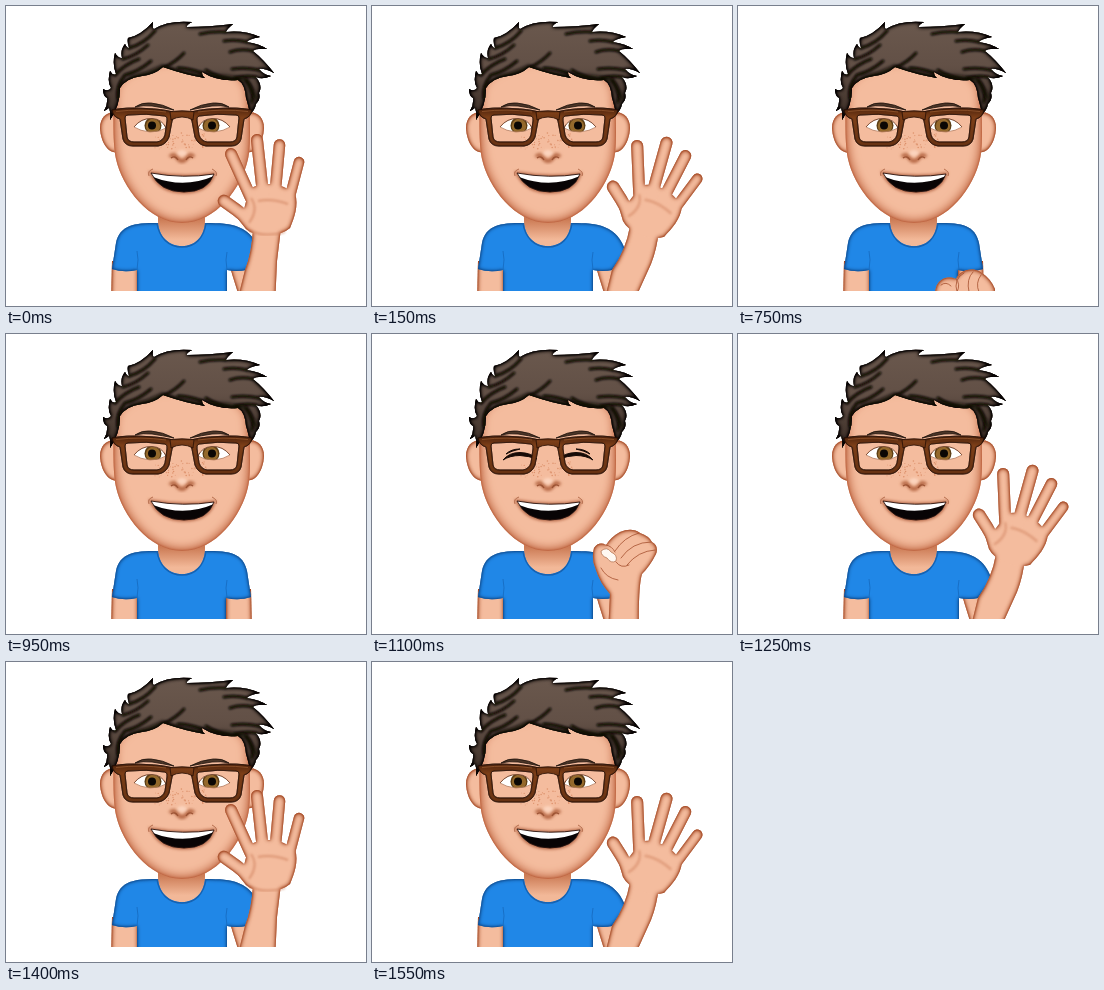
An HTML page for the animation above (1.7 s loop, 360 by 300 pixels).

```html
<!DOCTYPE html>
<html lang="en">
<head>
<meta charset="utf-8">
<title>Waving avatar</title>
<style>
html, body { margin: 0; width: 100%; height: 100%; overflow: hidden; background: #fff; }
svg { display: block; width: 360px; height: 300px; }
.skin { fill: #f4bc9e; stroke: none; }
.finger { fill: none; stroke: #f4bc9e; stroke-linecap: round; }
.crease { fill: none; stroke: #a04a28; stroke-linecap: round; opacity: .75; }
.palm { fill: none; stroke: #c4704b; stroke-width: 2; opacity: .5; }
.pose { visibility: hidden; animation: 1700ms step-end infinite; }
.inward { animation-name: inward; }
.outward { animation-name: outward; }
.low { animation-name: low; }
.lowered { animation-name: lowered; }
.raised { animation-name: raised; }
.fist { animation-name: fist; }
.open { animation-name: open; }
@keyframes inward { 0%, 82.35% { visibility: visible } 8.82%, 91.17%, 100% { visibility: hidden } }
@keyframes outward { 0%, 44.11%, 82.35% { visibility: hidden } 8.82%, 73.52%, 91.17%, 100% { visibility: visible } }
@keyframes low { 0%, 55.88%, 100% { visibility: hidden } 44.11% { visibility: visible } }
@keyframes lowered { 0%, 64.7%, 100% { visibility: hidden } 44.11% { visibility: visible } }
@keyframes raised { 0%, 64.7%, 100% { visibility: visible } 44.11% { visibility: hidden } }
@keyframes fist { 0%, 73.52%, 100% { visibility: hidden } 64.7% { visibility: visible } }
@keyframes open { 0%, 73.52%, 100% { visibility: visible } 64.7% { visibility: hidden } }
</style>
</head>
<body>
<svg viewBox="0 0 360 300">
<defs>
  <clipPath id="crop"><rect width="360" height="285"/></clipPath>
  <clipPath id="eyeShape"><path d="M128,121Q135,112 146,112.5Q156,113 160,122Q154,126 144,126Q134,125 128,121Z"/></clipPath>
  <clipPath id="mouthShape"><path id="mouth" d="M145,167Q177,173 208,168Q202,186 178,186Q154,186 145,167Z"/></clipPath>
  <clipPath id="hairShape"><path id="hair" d="M104,114Q105,107 103,102Q100,104 98,105Q102,98 101,92Q97,90 97,83Q102,86 105,82Q101,76 104,65Q107,70 110,68Q106,58 109,47Q112,52 116,52Q114,44 119,38Q121,42 123,42Q121,36 122,32Q134,30 147,16Q146,22 148,23Q162,14 186,16Q180,19 181,21Q203,21 227,18Q221,23 220,26Q238,24 254,31Q243,33 241,36Q254,38 261,43Q250,42 247,45Q258,54 268,67Q258,62 253,63Q258,69 265,70Q256,74 250,71Q257,80 253,87Q255,93 250,98Q249,104 244,108Q242,98 240,92Q239,78 232,74Q212,76 196,66Q196,70 199,72Q180,69 157,61Q148,69 136,70Q120,72 114,82Q114,100 104,114Z"/></clipPath>
  <linearGradient id="hairTone" x2="0" y2="1">
    <stop stop-color="#6a584d"/><stop offset=".45" stop-color="#625046"/><stop offset="1" stop-color="#3a2c24"/>
  </linearGradient>
  <linearGradient id="frameTone" x2="0" y2="1">
    <stop stop-color="#4e230c"/><stop offset=".25" stop-color="#7d3f18"/><stop offset="1" stop-color="#6a3414"/>
  </linearGradient>
  <linearGradient id="neckTone" x2="0" y2="1">
    <stop offset=".4" stop-color="#cb7a54"/><stop offset=".85" stop-color="#f2b898"/>
  </linearGradient>
  <filter id="soft" x="-50%" y="-50%" width="200%" height="200%"><feGaussianBlur stdDeviation="1.6"/></filter>
  <filter id="hazy" x="-20%" y="-20%" width="140%" height="140%"><feGaussianBlur stdDeviation=".9"/></filter>
</defs>

<g clip-path="url(#crop)">
  <path class="skin" filter="url(#limbRim)" d="M106,255H132V300H105Z"/>

  <g class="pose lowered">
    <path class="skin" filter="url(#limbRim)" d="M220,255H245L246,300H220Z"/>
    <path fill="#2087e7" filter="url(#shirtRim)" d="M151,217C128,217 114,219 110,237L106,263Q118,267 131,264V300H220V264Q233,267 245,263L241,237C237,219 224,217 200,217Z"/>
  </g>
  <g class="pose raised">
    <path class="skin" filter="url(#limbRim)" d="M223,258H244L240,300H236Z"/>
    <path fill="#2087e7" filter="url(#shirtRim)" d="M151,217C128,217 114,219 110,237L106,263Q118,267 131,264V300H221V264Q231,266 240,264L254,246C245,219 226,217 200,217Z"/>
  </g>
  <path d="M131,264Q133,253 131,245M221,264Q219,253 221,246" fill="none" stroke="#1565b8" opacity=".7"/>

  <path fill="url(#neckTone)" d="M152,195H199V216C198,232 188,240 176,240S153,232 152,216Z"/>
  <path d="M151,217C153,232 163,241 176,241S198,232 200,217" fill="none" stroke="#1562b2" stroke-width="1.5"/>

  <path id="ear" class="skin" filter="url(#limbRim)" d="M114,108C104,103 94,110 94,122C95,138 103,149 114,146Z"/>
  <use href="#ear" transform="translate(352) scale(-1 1)"/>
  <path class="skin" filter="url(#faceRim)" d="M108,85C107,115 107,140 110,153C116,181 143,217 176,217C210,217 236,181 242,153C245,140 244,115 243,85C238,42 113,42 108,85Z"/>

  <g id="freckles" fill="#d07a50" opacity=".65"></g>

  <path d="M164,151Q168,146 172,153Q176,157 180,153Q184,146 188,151" fill="none" stroke="#b86a47" stroke-width="4" filter="url(#soft)"/>
  <path d="M165,152Q169,149 172,154M180,154Q183,149 187,152" fill="none" stroke="#9d5435" stroke-width="1.4"/>
  <ellipse cx="176" cy="147" rx="5" ry="3" fill="#ffe0cd" opacity=".7" filter="url(#soft)"/>

  <use href="#mouth" stroke="#b96a48" stroke-width="3" filter="url(#soft)"/>
  <g clip-path="url(#mouthShape)">
    <rect x="140" y="160" width="75" height="30" fill="#fff"/>
    <path d="M147,171Q178,183 208,170V192H147Z" fill="#080405"/>
  </g>
  <use href="#mouth" fill="none" stroke="#2a1009" stroke-width=".9"/>
  <path d="M143,170Q141,165 147,163M210,170Q212,166 206,163" fill="none" stroke="#a85d3c" opacity=".8"/>

  <g class="pose open">
    <g id="eye">
      <g clip-path="url(#eyeShape)">
        <rect x="125" y="110" width="40" height="20" fill="#fff"/>
        <circle cx="147" cy="119.5" r="8.5" fill="#5b3d14"/>
        <circle cx="147" cy="120" r="7.2" fill="#94692c"/>
        <circle cx="146" cy="119.5" r="4" fill="#0b0704"/>
      </g>
      <path d="M128,121Q135,112 146,112.5Q156,113 160,122" fill="none" stroke="#7a4a32" stroke-width="1"/>
      <path d="M128,121Q134,125 144,126Q154,126 160,122" fill="none" stroke="#b47c5d" stroke-width=".8"/>
    </g>
    <use href="#eye" transform="translate(352) scale(-1 1)"/>
  </g>
  <g class="pose fist">
    <path id="shutEye" d="M131,126Q137,118.5 148,118.5Q160,119 165,125Q157,122 148,121.5Q138,121.5 131,126ZM134,120Q139,115 148,115Q139,117 134,120Z" fill="#170b07" stroke="#170b07" stroke-width="1"/>
    <use href="#shutEye" transform="translate(352) scale(-1 1)"/>
  </g>

  <path id="brow" d="M129,101Q136,96 145,97Q157,98 168,104Q156,101.5 146,100Q137,99 129,101Z" fill="#4b3527" stroke="#20140d" stroke-width=".8"/>
  <use href="#brow" transform="translate(352) scale(-1 1)"/>

  <use href="#hair" fill="url(#hairTone)" filter="url(#hairRim)"/>
  <g clip-path="url(#hairShape)" fill="none" stroke="#0d0705" stroke-linecap="round">
    <path stroke-width="3" filter="url(#hazy)" d="M112,92Q110,80 119,69Q132,66 145,55M109,69Q119,58 133,53M117,53Q130,50 142,39M123,42Q138,38 149,25M157,62Q170,56 178,47"/>
    <path stroke-width="3" filter="url(#hazy)" d="M196,67Q182,62 172,62M232,75Q212,72 200,64M247,45Q235,42 224,46M253,64Q240,61 226,63M250,71Q240,69 229,72M246,96Q249,84 240,74M241,36Q230,33 218,35M220,26Q207,25 194,28"/>
    <path stroke-width="5" opacity=".6" filter="url(#soft)" d="M116,80Q126,71 140,68L157,61Q182,70 200,70T240,74L250,92"/>
  </g>

  <g fill="url(#frameTone)" stroke="#260f05" stroke-width=".8">
    <path id="lens" fill-rule="evenodd" filter="url(#frameRim)" d="M106,104Q120,101 140,102.5Q156,103 167,106Q169,110 166,115L163,131Q160,139 152,140H127Q119,140 117,133L114,113Q107,111 106,104ZM119,112Q119,109 122,109Q140,107 159,110Q162,111 161,115L159,129Q157,135 151,136H128Q122,136 121,131Z"/>
    <use href="#lens" transform="translate(352) scale(-1 1)"/>
    <path d="M164,105.5Q176,104 188,105.5L187,114Q176,108 165,114Z"/>
  </g>
  <path d="M110,105.5Q135,102.5 160,106M192,106Q217,102.5 242,105.5" fill="none" stroke="#a7673a" opacity=".6"/>

  <g class="pose inward">
    <g filter="url(#limbRim)">
      <path class="skin" d="M247,222Q246,246 239,264L230,300H269L271,255L275,222Z"/>
      <g id="hand">
        <path class="skin" d="M242,184Q252,177 262,178Q274,177 289,187C293,200 288,212 284,222Q276,229 262,229Q248,230 240,223L232,213Q240,204 242,184Z"/>
        <g class="finger">
          <path stroke-width="12" d="M225,148L245,192M251,134L257,188"/>
          <path stroke-width="11.5" d="M273.5,139L269,188"/>
          <path stroke-width="10.5" d="M293,156L283,194"/>
          <path stroke-width="12.5" d="M218,195Q230,203 243,214"/>
        </g>
      </g>
    </g>
    <path id="creases" class="palm" filter="url(#hazy)" d="M245,192Q253,203 243,217M252,195Q266,192 282,198"/>
    <path class="palm" filter="url(#hazy)" d="M242,224Q258,232 279,226"/>
  </g>

  <g class="pose outward">
    <g filter="url(#limbRim)">
      <path class="skin" d="M258,220Q254,244 240,264L231,300H260L279,258Q285,243 287,224Z"/>
      <use href="#hand" transform="translate(18 2) rotate(22 262 200)"/>
    </g>
    <use href="#creases" transform="translate(18 2) rotate(22 262 200)"/>
  </g>

  <g class="pose low">
    <path class="skin" filter="url(#limbRim)" d="M196,300Q196,281 201,276Q208,269 218,273Q221,266 229,264Q238,262 244,267Q253,273 257,283V300Z"/>
    <path class="crease" d="M218,273Q223,278 219,286M226,267Q215,273 219,286M235,266Q228,273 231,286M243,269Q237,277 241,286M203,279Q208,275 213,280"/>
  </g>

  <g class="pose fist">
    <path class="skin" filter="url(#limbRim)" d="M236,300L238,260Q228,249 224,236Q219,225 222,214Q227,207 234,211Q239,203 248,198Q260,193 268,199Q277,202 280,208Q287,212 284,220Q278,232 270,240Q266,253 267,300Z"/>
    <path d="M229,217Q235,212 239,218Q246,221 244,227Q239,230 235,224Q229,222 229,217Z" fill="#fff8f2" stroke="#b77958" stroke-width=".8"/>
    <path class="crease" d="M234,211Q240,212 243,218M267,199Q252,203 243,217M279,208Q260,208 249,224M283,216Q266,217 255,231M244,228Q249,235 257,231M229,234Q234,244 246,246"/>
  </g>
</g>
</svg>
<script>
const svg = document.querySelector('svg');

// Inner rim shading: a wide soft band plus a fine dark edge.
function rim(id, color, wide, edge, strength) {
  const band = (size, gain, name) => `
    <feGaussianBlur in="SourceAlpha" stdDeviation="${size}" result="b"/>
    <feComposite in="SourceAlpha" in2="b" operator="out" result="o"/>
    <feFlood flood-color="${color}"/><feComposite in2="o" operator="in"/>
    <feComponentTransfer result="${name}"><feFuncA type="linear" slope="${gain}"/></feComponentTransfer>`;
  return `<filter id="${id}" x="-10%" y="-10%" width="120%" height="120%" color-interpolation-filters="sRGB">
    ${band(wide, strength, 'wide')}${band(edge, strength * .8, 'edge')}
    <feMerge><feMergeNode in="SourceGraphic"/><feMergeNode in="wide"/><feMergeNode in="edge"/></feMerge></filter>`;
}
svg.querySelector('defs').insertAdjacentHTML('beforeend',
  rim('faceRim', '#b04e28', 6, 1.2, 1.25) +
  rim('limbRim', '#a0431e', 2.6, .8, 1.45) +
  rim('shirtRim', '#0c4688', 2.2, .8, 1.3) +
  rim('hairRim', '#070302', 2.2, 1, 2) +
  rim('frameRim', '#210b02', 1.1, .5, 1));

let seed = 7;
const random = () => (seed = seed * 16807 % 2147483647) / 2147483647;
let dots = '';
for (let i = 0; i < 60; i++) {
  const x = 149 + random() * 54, y = 127 + random() * 16;
  dots += `<circle cx="${x.toFixed(1)}" cy="${y.toFixed(1)}" r="${(.4 + random() * .4).toFixed(2)}"/>`;
}
document.getElementById('freckles').innerHTML = dots;
</script>
</body>
</html>
```
